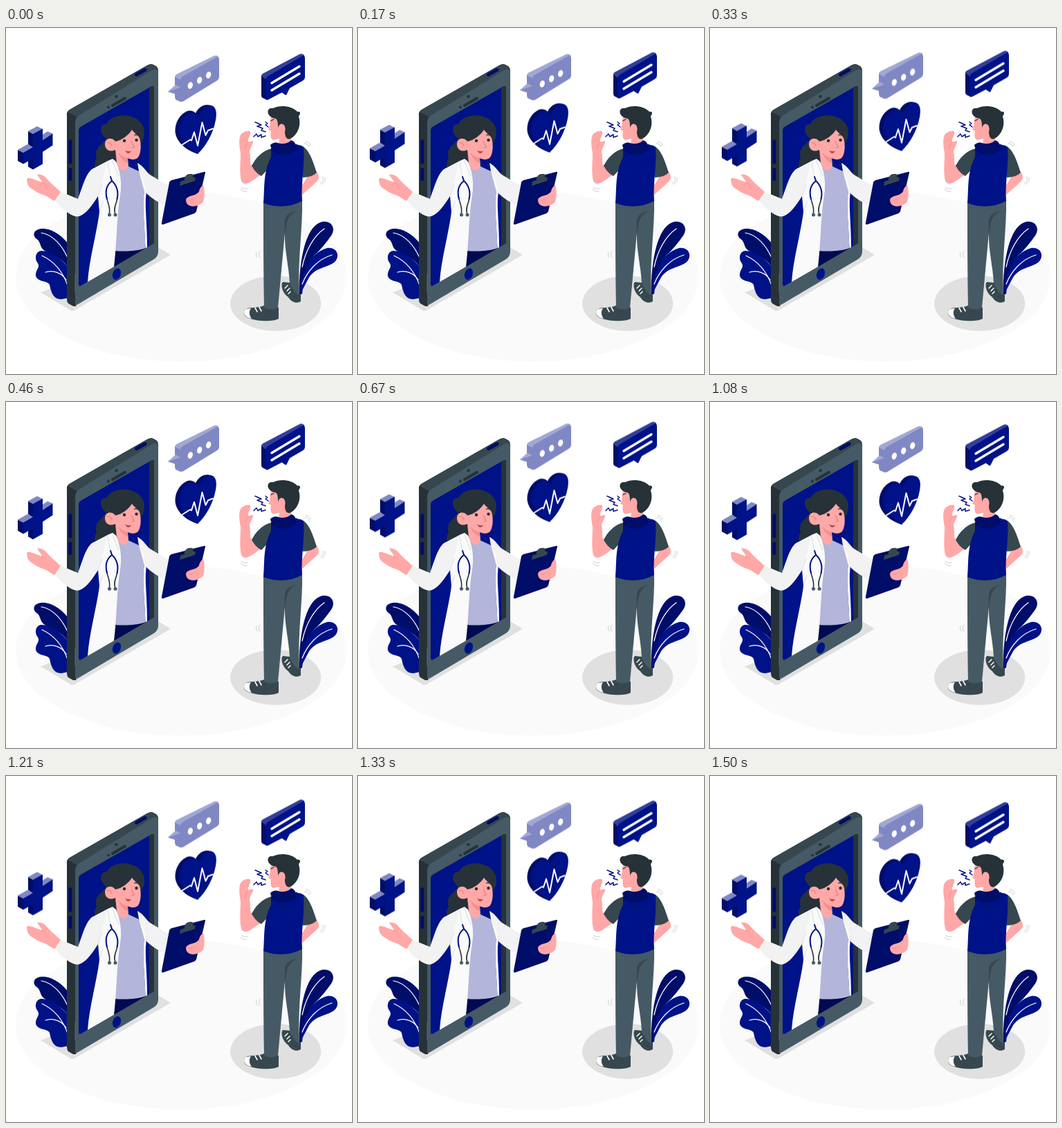
An HTML page for the animation above (1.54 s loop, 500 px wide and 500 px high).

```html
<!DOCTYPE html>
<html lang="en">
<head>
<meta charset="utf-8">
<title>Online doctor</title>
<style>
  html, body { margin: 0; width: 100%; height: 100%; overflow: hidden; background: #fff; }
  svg { display: block; width: 100vw; height: 100vh; }
  .navy { fill: #001288; }
  .deep { fill: #000d69; }
  .night { fill: #000a50; }
  .ink { fill: #263238; }
  .slate { fill: #37474f; }
  .steel { fill: #455a64; }
  .skin { fill: #ffa8a7; }
  .blush { fill: #f28f8f; }
  .coat { fill: #fafafa; }
  .sleeve { fill: #f2f2f2; }
  .lilac { fill: #b3b6da; }
  .mid { fill: #8088c4; }
  .pale { fill: #a2a8d5; }
  .shade { fill: #e0e0e0; }
  .white { fill: #fff; }
  .line { fill: none; stroke: #fff; stroke-linecap: round; stroke-linejoin: round; }
  .grey { stroke: #c9c9c9; stroke-width: .9; }
  .fold { stroke: #f28f8f; stroke-width: .9; }
  .dark { stroke: #263238; }
  .blue { stroke: #001288; }
  .dim { stroke: #000d69; }
</style>
</head>
<body>
<svg viewBox="0 0 500 500">
  <g id="floor">
    <ellipse cx="253" cy="359.5" rx="239" ry="122.5" fill="#fafafa"/>
    <path class="shade" d="M50 382 93 408Q96 410 99 408L236 329Q238 327 235 326L220 317Z"/>
    <ellipse class="shade" cx="389.7" cy="398" rx="65.5" ry="40"/>
  </g>

  <g id="left-plant">
    <path class="deep" d="M90 312C81 300 66 289 51 290C40 291 38 299 43 304C51 308 48 317 56 322C66 328 78 330 90 346Z"/>
    <path class="navy" d="M90 346C79 332 63 321 50 322C42 324 41 334 46 340C50 346 42 350 43 358C46 368 59 364 63 371C65 381 68 392 80 392L90 390Z"/>
    <path class="line" stroke-width="1.2" d="M51 296C68 299 81 314 89 332M52 329C69 337 82 352 89 372M57 353C70 349 81 355 87 364"/>
  </g>

  <g id="phone">
    <path class="ink" d="M88 126Q87 121 92 118L204 54Q209 51 213 53L218 56Q220 58 220 63L101 402 97 402 90 398Q88 396 88 392Z"/>
    <path class="slate" d="M89 121Q90 119 92 118L204 54Q209 51 213 53L218 56 216 64 103 129Z"/>
    <path class="steel" d="M100 137Q100 130 106 126L211 61Q220 56 220 65V323Q220 330 214 334L106 398Q100 402 100 398Z"/>
    <path class="navy" d="M105 148Q105 144 109 142L209 85Q214 82 214 87V311L109 372Q105 374 105 370Z"/>
    <path class="ink" d="M207 86 210 84.500Q214 82 214 87V311L207 315Z"/>
    <path class="line" style="stroke:#607680" stroke-width=".8" d="M100 356V382"/>
    <path class="line dim" stroke-width="5" d="M92.800 163.500V194M92.800 204.500V218.500M188.500 67.500 201 60.500"/>
    <path class="line dark" stroke-width="4" d="M154 112 172 101.500"/>
    <circle class="ink" cx="148" cy="114.500" r="1.900"/>
    <circle class="ink" cx="159.500" cy="99" r="2.200"/>
    <ellipse class="navy" cx="160" cy="355.500" rx="5.800" ry="8.500" transform="rotate(20 160 355.500)"/>
  </g>

  <g id="doctor">
    <path class="ink" d="M145 160C135 152 134 138 145 139C151 127 169 124 181 128C195 132 201 143 200 154C199 160 197 164 194 168L160 197 154 203 131 203C126 200 128 193 131 189C128 180 132 172 138 168Z"/>
    <path class="night" d="M157 319 202 312V318L156 345Z"/>
    <path class="lilac" d="M160 194C164 208 172 207 177 200L192 207C201 216 202 226 200 236C196 253 201 290 201.500 318C188 323 171 323 157 322L160 280Z"/>
    <path class="coat" d="M192 207C202 218 204 232 202 246C201 262 204 285 204 317L201.500 318C201 290 196 253 200 236Z"/>
    <path class="skin" d="M158 176C150 180 143 176 143 168C143 159 153 157 158 164C168 162 177 155 182 147C186 153 191 154 193 159C196 169 195 183 190 188C186 191 179 190 176 188L177 200C174 208 163 209 160 195Z"/>
    <path class="blush" d="M176 188C170 187 165 183 162 179C165 188 170 193 176 195Z"/>
    <circle class="ink" cx="171" cy="163" r="2.200"/>
    <circle class="ink" cx="188.500" cy="162" r="2.200"/>
    <path class="line dark" stroke-width="1.500" d="M166 159Q168 156 172 156M186 154.500Q190 153.500 193 157"/>
    <path class="line" style="stroke:#e57f82" stroke-width="1.200" d="M181 164 185.500 172 181.500 173M147 166Q151 164 153 170"/>
    <path d="M172 176.500Q176 179 180.500 177.500Q179 183 174.500 180.500Z" fill="#c9474f"/>
    <path class="sleeve" d="M190 195C199 200 202 207 208 212L238 230 230 257C220 252 210 246 201 237C202 223 197 215 192 207Z"/>
    <path class="sleeve" d="M147 192 128 202C116 206 111 229 104 247L80 237 70 248C81 263 98 275 106 272C116 269 126 254 133 243L150 230Z"/>
    <path class="coat" d="M147 192 154 189 159 193C165 207 168 224 165 242C160 270 160 315 156 345L118 367C120 335 131 297 135 266L133 243 139 222Z"/>
    <path class="line" style="stroke:#d8d8d8" stroke-width=".9" d="M147 193 150 212 164 238M133 243 139 226M135 266 140 250M153 190 163 214"/>
    <path class="skin" d="M79 237C72 230 66 226 60 219C56 213 49 210 45 212C47 216 51 219 52 223C45 221 36 216 31 217C29 220 31 222 31 225C33 230 36 232 40 234C47 240 57 241 63 246L70 250Z"/>
    <path class="line fold" d="M52 223Q56 224 58 228"/>
    <path class="line dark" stroke-width="1.600" d="M145 243C146 251 152 260 149 269M161 244C161 252 154 260 158 269"/>
    <path class="line blue" stroke-width="2" d="M151 215 153 221C145 227 143 236 146 247M153 221C160 227 163 237 160.500 247"/>
    <circle class="steel" cx="149.500" cy="270" r="2.500"/>
    <circle class="steel" cx="158" cy="270" r="2.500"/>
    <path class="deep" d="M239 220 286 208Q288 207 288 209L275 265Q274 267 272 268L227 284Q224 284 225 281L236 223Q237 221 239 220Z"/>
    <path class="slate" d="M251 228 252 222 258 220C257 212 266 209 271 212L270 216 274 216 273 221Z"/>
    <path class="skin" d="M261 246C266 241 275 243 279 236C280 231 284 226 286 229C287 237 287 245 285 251C281 256 272 259 266 257C260 255 259 248 261 246Z"/>
    <path class="line fold" d="M264 249Q271 249 275 246"/>
  </g>

  <g id="right-plant">
    <path class="deep" d="M424 386C423 343 431 286 457 280C471 278 477 290 470 300C462 311 456 319 446 328C436 339 430 360 428 384Z"/>
    <path class="navy" d="M425 385C427 350 440 325 464 318C478 316 483 329 476 337C465 348 446 344 436 364Z"/>
    <path class="line" stroke-width="1.300" d="M460 290C444 301 433 322 428 345M471 328C451 334 436 350 428 370"/>
  </g>

  <g id="patient">
    <path class="slate" d="M400 367C396 371 400 384 408 389C412 396 420 399 426 395L426 385C419 382 413 374 410 368Z"/>
    <path class="line" stroke-width="1.500" d="M403 376 407 372M406 380 410 376M411 381 408 384"/>
    <path class="slate" d="M347 406C352 403 365 405 373 401L394 404V420C386 425 362 424 350 419C342 416 343 409 347 406Z"/>
    <path class="white" d="M347 406 354 405C351 409 351 415 355 420C343 418 342 410 347 406Z"/>
    <path class="line" stroke-width="1.600" d="M360 404.500 363 410M366 403.500 369 409"/>
    <path class="steel" d="M372 250 428 249C429 290 421 335 424 386C417 384 413 375 410 369C409 345 402 320 403 296L393 404Q383 409 373 404C372 350 372 300 372 250Z"/>
    <path class="slate" d="M402.500 300 403 277Q404 268 420 264Q407 271 405.500 283Z"/>
    <path class="skin" d="M448 207C453 213 454 218 448 223L428 241 427 229 435 216Z"/>
    <path class="slate" d="M424 169C438 172 444 194 449 209Q442 216 429 216L424 200Z"/>
    <path class="skin" d="M355 198C352 198 354 190 352 178C353 172 358 167 357 163L350 165C349 158 356 153 352 149C347 148 340 151 338 157C336 165 338 174 339 181C339 195 337 208 340 221C343 227 349 225 354 222L370 211Z"/>
    <path class="line fold" d="M350 165Q346 169 346 174"/>
    <path class="slate" d="M384 174C369 178 361 188 355 199Q360 209 369 214L385 197Z"/>
    <path class="navy" d="M383 174 420 168 430 172C432 198 426 224 428 250Q402 264 372 253C374 232 371 210 383 186Z"/>
    <path class="skin" d="M384 126C380 135 383 141 379 147L383 149C382 155 382 160 386 162L395 160 394 168Q407 172 412 161L414 130Z"/>
    <path class="deep" d="M382 169Q388 163 396 167Q408 168 412 162Q419 164 420 174Q413 184 397 183Q384 182 382 169Z"/>
    <path class="ink" d="M379 124C377 118 381 115 386 116C395 111 413 112 421 121Q425 120 425 124Q423 127 423 128C427 140 422 154 411 160C405 162 403 156 403 150C405 144 402 138 397 139L394 146C392 141 394 134 390 131C387 130 382 130 379 124Z"/>
    <ellipse class="skin" cx="398" cy="144.500" rx="4.800" ry="6" transform="rotate(12 398 144.500)"/>
    <path class="line dark" stroke-width="1.300" d="M383 134 387 132"/>
    <path class="line blue" stroke-width="1.500" d="M360 136 369 140 363 142 371 145 369 148 375 150M358 157 362 153 364 157 369 154 369 158 375 156M375 136 378 138 375 140 379 143"/>
    <path class="line grey" d="M431 167Q437 166 438 172M433 164Q440 164 440 170M458 215Q460 220 454 225M461 216Q463 222 456 226M340 230Q344 234 350 232M339 233Q344 238 348 236M362 324Q360 328 363 331M367 322Q364 327 367 332"/>
  </g>

  <g id="floating">
    <g>
      <path class="deep" d="M17 176 25 180V196.500L17 192ZM32 149 39 153V173L32 168ZM32 190 39 187V204.500L32 200.500Z"/>
      <path class="mid" d="M17 176 31 168 39 172 25 180ZM32 149 45 142 53 146 39 153ZM53 162V154L60 149.500 67.500 152.500Z"/>
      <path class="navy" d="M25 180 39 172V153L53 145.500V162L67.500 152.500V169.500L53 179V196.500L39 204.500V188.500L25 196.500Z"/>
    </g>
    <g>
      <path class="deep" d="M277 182C261 177 246 165 244.500 150C244 138 250 126 260 121C266 118 271 120 274 123C279 113 288 109 296 112L290 150Z"/>
      <path class="navy" d="M277 182C268 178 251 164 250 149C250 138 257 126 266 123C272 121 276 123 278 129C282 118 290 110 297 112C304 114 305 123 303 133C300 151 289 171 277 182Z"/>
      <path class="line" stroke-width="2" d="M255 168.500 266 161.500 268 162.500 272 150.500 277 170 283.500 136.500 288.500 155 292 148 299 145.500"/>
    </g>
    <g>
      <path class="mid" d="M244 70 252 74 253 107 246 104Q244 103 244 98Z"/>
      <path class="pale" d="M244 70Q244 68 247 66.500L301 40Q304 39 307 41L307 46 253 75Z"/>
      <path class="mid" d="M252 76Q252 72 255 70L303 43Q308 40 308 46V71Q308 74 305 76L256 106Q252 108 252 103Z"/>
      <path class="pale" d="M234 92 245 82 252 86 250 96Z"/>
      <path class="mid" d="M234 92 252 86V98Z"/>
      <ellipse class="white" cx="266.300" cy="83" rx="3.500" ry="5" transform="rotate(18 266.300 83)"/>
      <ellipse class="white" cx="279.700" cy="75.500" rx="3.500" ry="5" transform="rotate(18 279.700 75.500)"/>
      <ellipse class="white" cx="292.700" cy="68" rx="3.500" ry="5" transform="rotate(18 292.700 68)"/>
    </g>
    <g>
      <path class="deep" d="M369 69 376 71 377 104 371 101Q369 100 369 97Z"/>
      <path d="M369 69Q369 67 371 66L424 38Q427 36 431 39L431 44 376 75Z" fill="#333f9b"/>
      <path class="deep" d="M397 92 404 97 408 86Z"/>
      <path class="navy" d="M375 75Q375 72 378 70L427 41Q432 38 432 44V71Q432 74 429 76L410 87 405 97 399 93 380 103Q375 106 375 100Z"/>
      <path class="line" stroke-width="3.400" d="M384 79.500 424 55.500M384 90 424 66"/>
    </g>
  </g>
</svg>
<script>
  const LOOP = 1540, FRAMES = 37, RISE = 10;
  const rest = FRAMES - 1;

  // Linear bob, lowest on the last step, held at 24 steps a second.
  const bob = [];
  for (let i = 0; i <= FRAMES; i++) {
    const phase = ((i - rest + FRAMES) % FRAMES) / FRAMES;
    const lift = RISE * (1 - Math.abs(1 - 2 * phase));
    bob.push({
      offset: i === FRAMES ? 1 : Math.round(i * 100 / 24) * 10 / LOOP,
      transform: `translateY(${(0.5 - lift).toFixed(3)}px)`,
      easing: 'step-end'
    });
  }
  document.getElementById('floating').animate(bob, { duration: LOOP, iterations: Infinity });
</script>
</body>
</html>
```
